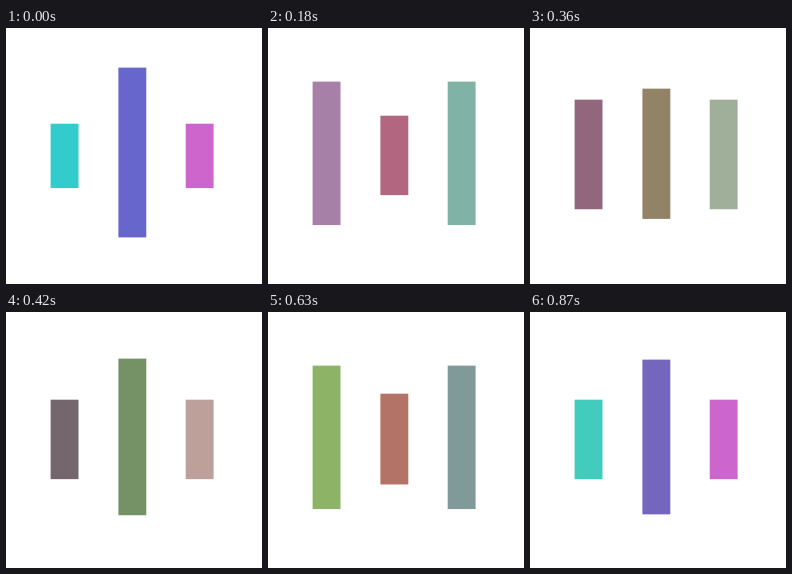
Write an HTML page that moves like this. It is 256 px wide and 256 px high and loops after 0.9 s.

```html
<!DOCTYPE html>
<html lang="en">
<head>
<meta charset="utf-8">
<title>Three bars</title>
<style>
  html, body { margin: 0; width: 100%; height: 100%; overflow: hidden; background: #fff; }
  svg { display: block; width: 100vw; height: 100vh; }

  rect {
    width: 27.9px;
    animation-duration: 900ms;
    animation-delay: -2ms;
    animation-iteration-count: infinite;
  }
  .left  { x: 44.6px;  animation-name: outer, left; }
  .mid   { x: 112.4px; animation-name: inner, mid; }
  .right { x: 179.7px; animation-name: outer, right; }

  /* Sizes: outer bars grow while the inner one shrinks, one step per 30 ms */
  @keyframes outer {
    0%, 50%, 100%      { y: 95.7px; height: 64.4px;  animation-timing-function: steps(8); }
    26.6667%, 76.6667% { y: 39.6px; height: 169.8px; animation-timing-function: steps(7); }
  }
  @keyframes inner {
    0%       { y: 39.6px; height: 169.8px; animation-timing-function: steps(7); }
    23.3333% { y: 95.7px; height: 64.4px;  animation-timing-function: steps(8); }
    50%      { y: 39.6px; height: 169.8px; animation-timing-function: steps(8); }
    76.6667% { y: 95.7px; height: 64.4px;  animation-timing-function: steps(7); }
    100%     { y: 39.6px; height: 169.8px; }
  }

  /* Colours */
  @keyframes left {
    0%       { fill: #33cccc; animation-timing-function: steps(8); }
    26.6667% { fill: #cc6699; animation-timing-function: steps(7); }
    50%      { fill: #666666; animation-timing-function: steps(8); }
    76.6667% { fill: #99cc66; animation-timing-function: steps(7); }
    100%     { fill: #33cccc; }
  }
  @keyframes mid {
    0%       { fill: #6666cc; animation-timing-function: steps(8); }
    26.6667% { fill: #cc6666; animation-timing-function: steps(7); }
    50%      { fill: #669966; animation-timing-function: steps(8); }
    76.6667% { fill: #cc6666; animation-timing-function: steps(7); }
    100%     { fill: #6666cc; }
  }
  @keyframes right {
    0%       { fill: #cc66cc; animation-timing-function: steps(8); }
    26.6667% { fill: #66cc99; animation-timing-function: steps(7); }
    50%      { fill: #cc9999; animation-timing-function: steps(8); }
    76.6667% { fill: #669999; animation-timing-function: steps(6); }
    96.6667%, 100% { fill: #cc66cc; }
  }
</style>
</head>
<body>
<svg viewBox="0 0 256 256">
  <rect class="left"/>
  <rect class="mid"/>
  <rect class="right"/>
</svg>
</body>
</html>
```
